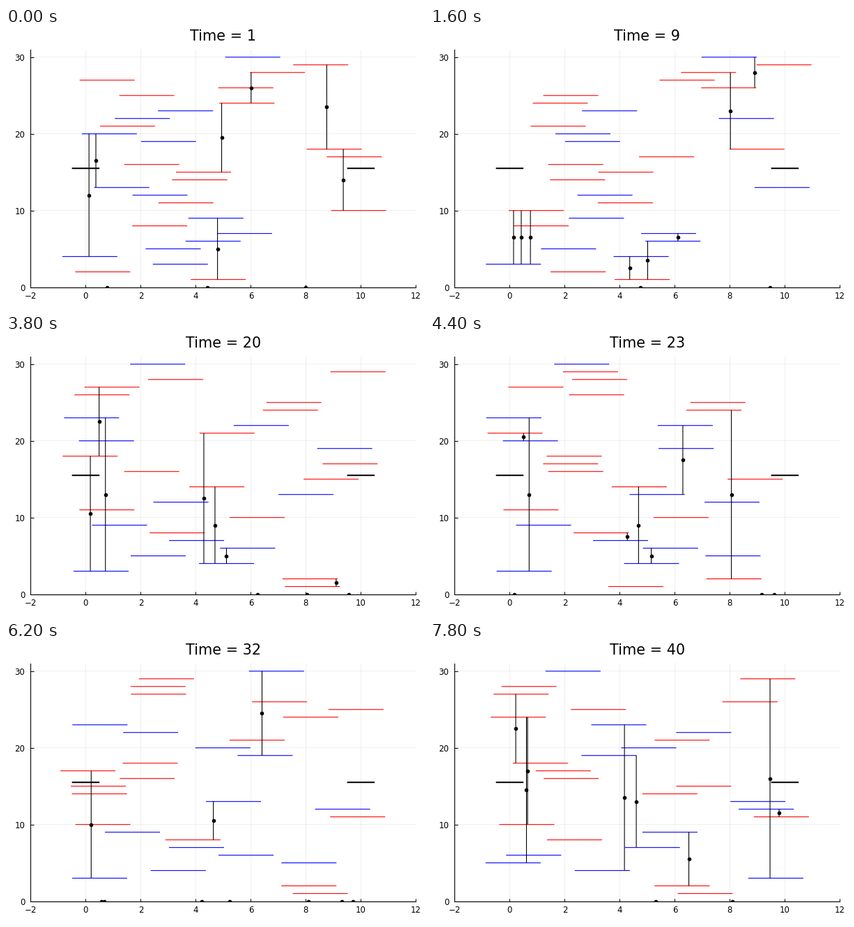
Write a matplotlib script that moves like this. It is 600 px wide and 400 px high and loops after 8 s.

```python
import numpy as np
import matplotlib.pyplot as plt
from matplotlib.animation import FuncAnimation
from matplotlib.collections import LineCollection

W, H, DPI = 600, 400, 100
PX = 72 / DPI                      # one pixel in points
LEFT, RIGHT, TOP, BOTTOM = 35.4, 588.4, 30.8, 371.6
STEPS, INTERVAL = 40, 200

LENGTH = 2
TURNOVER, BINDING, JITTER = 0.15, 0.45, 0.02
BLUE = {3, 4, 5, 6, 7, 9, 12, 13, 19, 20, 22, 23, 30}

# Left ends of filaments 1..30 when the run begins
STARTS = [3.82, -.38, 2.44, -.85, 2.18, 3.63, 4.77, 1.69, 3.73, 8.92,
          2.64, 1.70, .31, 3.14, 3.28, 1.40, 8.76, 8.03, 2.01, -.14,
          .52, 1.06, 2.63, 4.86, 1.22, 4.82, -.22, 5.97, 7.54, 5.07]
# Motors creep from the first site to the second
FIRST = np.array([.12, .37, .78, 4.41, 4.79, 4.94, 6.01, 8.0, 8.76, 9.36])
LAST = np.array([.22, .61, .65, 4.17, 4.6, 5.3, 6.51, 8.1, 9.46, 9.79])
# Motor index: the two filaments it joins at the beginning
BONDS = {0: (4, 20), 1: (13, 20), 4: (1, 9), 5: (15, 24),
         6: (24, 28), 8: (18, 29), 9: (10, 18)}


def simulate(seed=7):
    """Filaments turn over at random; motors join two filaments above their site."""
    rng = np.random.default_rng(seed)
    starts, bonds = np.array(STARTS), dict(BONDS)
    history = []
    for step in range(STEPS):
        sites = FIRST + (LAST - FIRST) * step / (STEPS - 1)
        if step:
            bound = [y - 1 for y in {y for pair in bonds.values() for y in pair}]
            starts[bound] += rng.normal(0, JITTER, len(bound))
            replaced = rng.random(len(starts)) < TURNOVER
            starts = np.where(replaced, rng.uniform(-1, 9, len(starts)), starts)
            for m, x in enumerate(sites):
                above = 1 + np.flatnonzero((starts <= x) & (x <= starts + LENGTH))
                if m in bonds:
                    lost = any(replaced[y - 1] or y not in above for y in bonds[m])
                    if lost:
                        del bonds[m]
                elif len(above) > 1 and rng.random() < BINDING:
                    bonds[m] = tuple(sorted(rng.choice(above, 2, replace=False)))
        motors = [(x, *bonds.get(m, (0, 0))) for m, x in enumerate(sites)]
        history.append((starts.copy(), motors))
    return history


history = simulate()

plt.rcParams["font.family"] = "DejaVu Sans"
fig = plt.figure(figsize=(W / DPI, H / DPI), dpi=DPI, facecolor="white")
ax = fig.add_axes([LEFT / W, 1 - BOTTOM / H, (RIGHT - LEFT) / W, (BOTTOM - TOP) / H])
ax.set(xlim=(-2, 12), ylim=(0, 31), xticks=range(-2, 13, 2), yticks=range(0, 31, 10))
ax.spines[["top", "right"]].set_visible(False)
ax.spines[["left", "bottom"]].set_linewidth(1.1 * PX)
ax.tick_params(direction="in", length=4.5 * PX, width=PX, labelsize=11.8 * PX)
ax.tick_params(axis="x", pad=6 * PX)
ax.tick_params(axis="y", pad=8 * PX)
ax.grid(color="black", alpha=0.1, linewidth=0.6 * PX)
ax.set_axisbelow(True)
for line in ax.get_xgridlines() + ax.get_ygridlines():
    line.set_snap(False)

title = fig.text((LEFT + RIGHT) / 2 / W, 1 - 18 / H, "", fontsize=20.8 * PX,
                 ha="center", va="baseline")


def add_lines(color, width, z):
    lines = LineCollection([], colors=color, linewidths=width * PX, zorder=z,
                           capstyle="butt", snap=False)
    return ax.add_collection(lines, autolim=False)


colors = ["blue" if y in BLUE else "red" for y in range(1, len(STARTS) + 1)]
filaments = add_lines(colors, 1.1, 3)
anchors = add_lines("black", 2, 4)
anchors.set_segments([[(x - .5, 15.5), (x + .5, 15.5)] for x in (0, 10)])
links = add_lines("black", 1.1, 5)
dots, = ax.plot([], [], "o", color="black", markersize=5.6 * PX,
                markeredgewidth=0, zorder=6, snap=False)


def draw(i):
    starts, motors = history[i]
    title.set_text(f"Time = {i + 1}")
    filaments.set_segments([[(x, y), (x + LENGTH, y)] for y, x in enumerate(starts, 1)])
    links.set_segments([[(x, lo), (x, hi)] for x, lo, hi in motors if hi])
    dots.set_data([x for x, _, _ in motors], [(lo + hi) / 2 for _, lo, hi in motors])
    return title, filaments, links, dots


anim = FuncAnimation(fig, draw, frames=STEPS, interval=INTERVAL, repeat=True)
plt.show()
```
